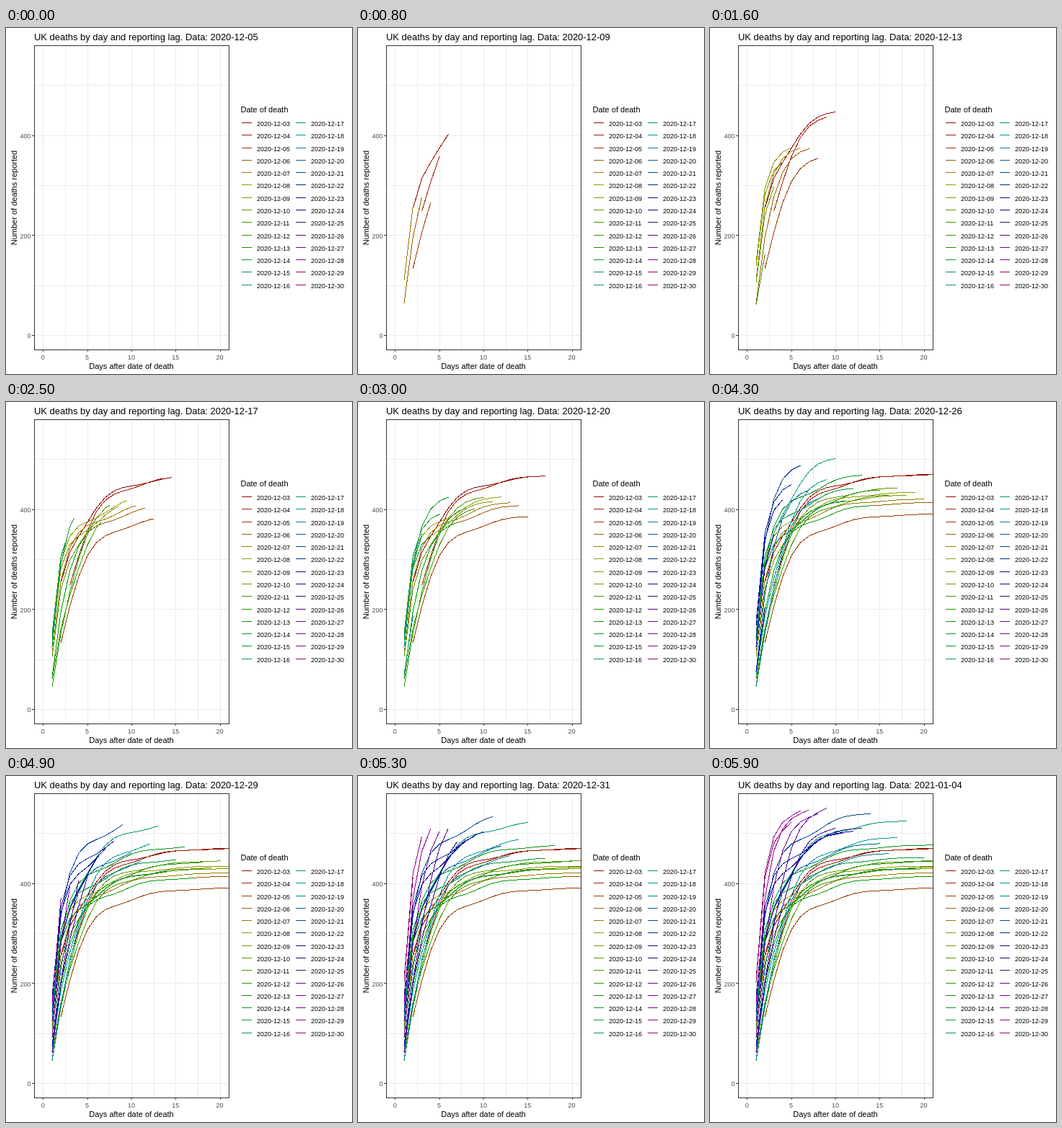
Recreate the animation shown at these times as an HTML page. Size 480 by 480 pixels, loop 10000 ms.

```html
<!DOCTYPE html>
<html lang="en">
<head>
<meta charset="utf-8">
<title>Deaths by reporting lag</title>
<style>
  html, body { margin: 0; height: 100%; overflow: hidden; background: #fff; }
  svg { display: block; width: 100vw; height: 100vh; }
  text { font-family: "Liberation Sans", Arial, sans-serif; font-size: 9px; }
  path, rect, polyline { fill: none; shape-rendering: crispEdges; }
  .grid { stroke: #ebebeb; }
  .frame { stroke: #333; }
  .tick { fill: #4d4d4d; }
  .name { font-size: 11px; }
</style>
</head>
<body>
<svg id="chart" viewBox="0 0 480 480">
  <clipPath id="panel"><rect x="39" y="24" width="271" height="423"/></clipPath>
</svg>
<script>
const svg = document.getElementById("chart");
const DAYS = 30, STEPS = 59, STEP_MS = 100, LOOP_MS = 10000;
const FIRST = 3, MAX_LAG = 21; // first date of death in December, longest lag drawn

// Latest total for each date of death
const TOTALS = [470, 471, 391, 414, 421, 435, 430, 446, 433, 445, 414, 477, 452, 430,
  525, 492, 460, 480, 540, 511, 505, 502, 511, 551, 540, 548, 546, 523];

const px = lag => 51.7 + 12.27 * lag;
const py = n => 426.45 - 0.693 * n;
const crisp = v => Math.floor(v) + 0.5;
const isoDate = day => new Date(Date.UTC(2020, 11, day)).toISOString().slice(0, 10);
const color = i => `hsl(${i * 320 / 27} 100% 30%)`;

function add(tag, attrs, text = "") {
  const el = document.createElementNS("http://www.w3.org/2000/svg", tag);
  for (const key in attrs) el.setAttribute(key, attrs[key]);
  el.textContent = text;
  return svg.appendChild(el);
}

// Share of deaths reported after a lag: a fast part that is slowest for deaths
// before a weekend, and a slow part that pauses each weekend.
function reported(day, lag) {
  const week = d => 2 * Math.PI * d / 7;
  const pace = Math.cos(week(day - 8));
  const workLag = lag - 0.6 * (Math.sin(week(day + lag - 6)) - Math.sin(week(day - 6)));
  const fast = (0.36 - 0.08 * pace) * Math.exp(-(1.05 + 0.55 * pace) * (lag - 1));
  const slow = 0.53 * Math.exp(-0.24 * workLag);
  return 1 - fast - slow;
}

function makeSeries(total, i) {
  const day = FIRST + i;
  const last = Math.min(MAX_LAG, DAYS + 2 - i);
  const start = [2, 3, 2][i] ?? 1;
  const scale = total / reported(day, last);
  const count = lag => scale * reported(day, lag);
  return { start, last, count };
}

// Grid
for (let lag = 0; lag <= 20; lag += 2.5) add("path", { class: "grid", d: `M${crisp(px(lag))} 25V446` });
for (let n = 0; n <= 500; n += 100) add("path", { class: "grid", d: `M40 ${crisp(py(n))}H309` });

// Series
const series = TOTALS.map(makeSeries);
const lines = add("g", { "clip-path": "url(#panel)" });
series.forEach((s, i) => {
  s.line = add("polyline", { stroke: color(i) });
  lines.append(s.line);
});

// Axes
add("rect", { class: "frame", x: 39.5, y: 24.5, width: 270, height: 422 });
for (let lag = 0; lag <= 20; lag += 5) {
  add("path", { class: "frame", d: `M${crisp(px(lag))} 447v2` });
  add("text", { class: "tick", x: px(lag) - 0.5, y: 460, "text-anchor": "middle" }, lag);
}
for (let n = 0; n <= 400; n += 200) {
  add("path", { class: "frame", d: `M36 ${crisp(py(n))}h3` });
  add("text", { class: "tick", x: 34.5, y: Math.round(py(n)) + 4, "text-anchor": "end" }, n);
}
add("text", { class: "name", x: 174, y: 473, "text-anchor": "middle" }, "Days after date of death");
add("text", { class: "name", transform: "translate(15 235.5) rotate(-90)", "text-anchor": "middle" },
  "Number of deaths reported");
const title = add("text", { x: 39, y: 17, style: "font-size:12.95px" });

// Legend
add("text", { class: "name", x: 325.5, y: 117 }, "Date of death");
series.forEach((_, i) => {
  const x = i < 14 ? 327 : 402, y = crisp(131.5 + 17.28 * (i % 14));
  add("path", { stroke: color(i), d: `M${x} ${y}h14` });
  add("text", { x: x + 21, y: y + 4 }, isoDate(FIRST + i));
});

// Each day lands on a whole step; a step between two days is halfway.
function dayAt(step) {
  const raw = step * DAYS / STEPS, day = Math.round(raw);
  return Math.round(day * STEPS / DAYS) === step ? day : Math.floor(raw) + 0.5;
}

function drawLine({ start, last, count, line }, lagNow) {
  const end = Math.min(last, lagNow), pts = [];
  const plot = (lag, n) => pts.push(px(lag).toFixed(2) + "," + py(n).toFixed(2));
  for (let lag = start; lag <= end; lag++) plot(lag, count(lag));
  if (pts.length && end % 1) plot(end, (count(end - 0.5) + count(end + 0.5)) / 2);
  line.setAttribute("points", pts.length > 1 ? pts.join(" ") : "");
}

let shown = -1;
function render(now) {
  const step = Math.min(STEPS, Math.floor(now % LOOP_MS / STEP_MS));
  if (step === shown) return;
  shown = step;
  const day = dayAt(step);
  series.forEach((s, i) => drawLine(s, day + 2 - i));
  title.textContent = "UK deaths by day and reporting lag. Data: "
    + isoDate(5 + Math.floor(step * DAYS / STEPS));
}

const begin = performance.now();
function tick() {
  render(performance.now() - begin);
  requestAnimationFrame(tick);
}
tick();
</script>
</body>
</html>
```
